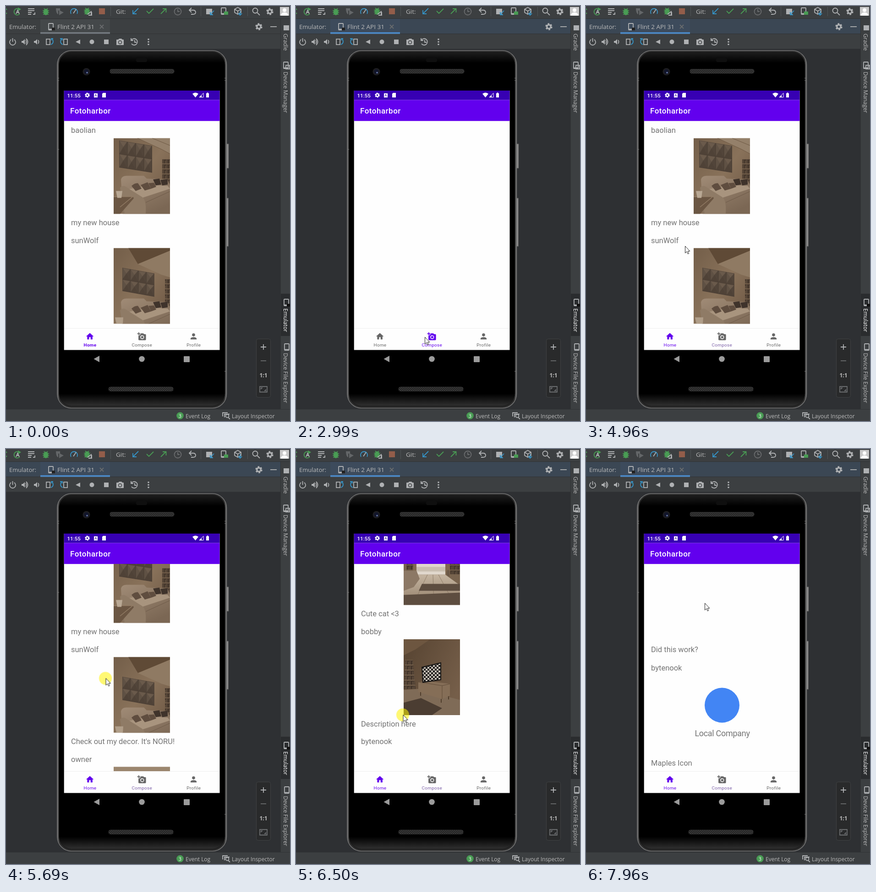
Animation of 620 by 903 pixels, one loop 8 s. Source, as an HTML page:

```html
<!DOCTYPE html>
<html lang="en">
<head>
<meta charset="utf-8">
<title>Emulator</title>
<style>
html, body { margin: 0; width: 100%; height: 100%; overflow: hidden; background: #3c3f41; }
svg { display: block; }
#stage { width: 620px; height: 903px; }
text { white-space: pre; }
.ide { font: 12px "Open Sans", "Noto Sans", sans-serif; fill: #bbb; }
.app { font-family: Roboto, sans-serif; }
.post { font-size: 16.5px; fill: #737373; }
.nav { font-size: 9.9px; letter-spacing: .33px; text-anchor: middle; }
.line { fill: none; stroke: #afb1b3; stroke-width: 1.8; }
.solid { fill: #afb1b3; }
.dim { stroke: #6a6c6e; }
.green { stroke: #499c54; }
.blue { stroke: #3592c4; }

#cursor, #feed, #dot, .focus, .page, .photos, .ripple, .home, .compose, .label {
  animation: 8s linear infinite;
}
#dot, .focus, .page, .photos, .home, .compose, .label { animation-timing-function: step-end; }
#cursor { animation-name: move; }
#feed { animation-name: scroll; }
#dot { animation-name: press; }
.focus { animation-name: focus; }
.page { animation-name: page; }
.photos { animation-name: photos; }
.home { animation-name: home; }
.compose { animation-name: compose; }
.label { animation-name: label; }
.ripple { transform-box: fill-box; transform-origin: center; }
#rippleA { animation-name: rippleA; }
#rippleB { animation-name: rippleB; }

@keyframes move {
  0%, 6.36% { transform: translate(574px, 925px); }
  6.37% { transform: translate(574px, 893px); }
  16.25% { transform: translate(400px, 782px); }
  17.1% { transform: translate(390px, 772px); }
  20.5%, 27.09% { transform: translate(279px, 720px); }
  27.1%, 41.25% { transform: translate(281px, 720px); }
  46.25%, 51.8% { transform: translate(217.5px, 723px); }
  61.1% { transform: translate(192px, 514px); }
  62%, 65.3% { transform: translate(216px, 522px); }
  68.3%, 68.8% { transform: translate(217px, 578px); }
  71.1% { transform: translate(217.5px, 501px); }
  73.8%, 76% { transform: translate(220px, 317px); }
  80.3%, 85.3% { transform: translate(233.5px, 578px); }
  90%, 100% { transform: translate(259px, 335px); }
}
@keyframes scroll {
  0%, 68.8% { transform: translateY(0); }
  71.1%, 71.15% { transform: translateY(-74px); }
  73.8% { transform: translateY(-252px); }
  75.37% { transform: translateY(-348px); }
  76.5% { transform: translateY(-438px); }
  77.8% { transform: translateY(-518px); }
  79.2% { transform: translateY(-569px); }
  80.7%, 85.5% { transform: translateY(-591px); }
  90% { transform: translateY(-825px); }
  91.5% { transform: translateY(-907px); }
  93.2% { transform: translateY(-962px); }
  95.4% { transform: translateY(-989px); }
  98%, 100% { transform: translateY(-992px); }
}
@keyframes press {
  0%, 32.6%, 49.6%, 73.9%, 90%, 100% { opacity: 0; }
  30.6%, 47.9%, 68.5%, 80.8% { opacity: 1; }
}
@keyframes focus { 0% { opacity: 0; } 30.7%, 100% { opacity: 1; } }
@keyframes page { 0%, 54%, 100% { opacity: 1; } 32.6% { opacity: 0; } }
@keyframes photos { 0%, 56%, 100% { opacity: 1; } 32.6% { opacity: 0; } }
@keyframes home {
  0% { fill: #6200ee; font-weight: 600; }
  32.6% { fill: #666; font-weight: 400; }
  49.6%, 100% { fill: #6200ee; font-weight: 400; }
}
@keyframes compose { 0%, 49.6%, 100% { fill: #666; } 32.6% { fill: #6200ee; } }
@keyframes label { 0%, 49.6% { fill: #666; } 32.6% { fill: #6200ee; } 54%, 100% { fill: #7c60a8; } }
@keyframes rippleA {
  0%, 30.6% { opacity: 0; transform: scale(.3); }
  32.6% { opacity: 1; transform: scale(1); }
  37%, 100% { opacity: 0; transform: scale(1.2); }
}
@keyframes rippleB {
  0%, 47.9% { opacity: 0; transform: scale(.3); }
  50.3%, 51.6% { opacity: 1; transform: scale(1); }
  56%, 100% { opacity: 0; transform: scale(1.2); }
}
</style>
</head>
<body>
<svg id="stage" viewBox="0 0 620 903">
<defs>
  <g id="gear" fill="none">
    <circle r="4.2" stroke-width="3.2"/>
    <circle r="6.4" stroke-width="2.6" stroke-dasharray="3.7 3"/>
  </g>
  <g id="bug">
    <path d="M-7-2H7M-7 2H7M-6 6H6M-4-7 4 6M4-7-4 6" stroke-width="1.6"/>
    <ellipse cy="1" rx="4.6" ry="6.5"/>
  </g>
  <g id="phone"><rect x="-5" y="-7" width="10" height="14" rx="1" class="line"/><path d="M-4 5.5H4" class="line"/></g>
  <g id="speaker"><path d="M-7-2h3l4-4V6l-4-4h-3z" class="solid"/></g>
  <pattern id="mesh" width="4" height="4" patternUnits="userSpaceOnUse">
    <rect width="4" height="4" fill="#101010"/><path d="M0 0 4 4M4 0 0 4" stroke="#5b5b5b" stroke-width=".8"/>
  </pattern>
  <pattern id="tiles" width="18" height="31" patternUnits="userSpaceOnUse">
    <rect width="18" height="31" fill="#463a30"/>
    <path d="M.5.500H17.500L9 14z" fill="#6a5a4b"/><path d="M17.500.500V30.500L9 14z" fill="#52453a"/>
    <path d="M.5.500V30.500L9 14z" fill="#5f5144"/><path d="M.5 30.500H17.500L9 14z" fill="#4f4237"/>
  </pattern>
  <pattern id="shelf" width="17" height="11" patternUnits="userSpaceOnUse">
    <rect width="17" height="11" fill="#45372c"/><path d="M0 1H17" stroke="#826b54" stroke-width="1.6"/>
    <path d="M3 4v7M6 3v8M11 5v6M14 3v8" stroke="#6b5846" stroke-width="1.3"/>
  </pattern>
  <pattern id="check" width="8" height="8" patternUnits="userSpaceOnUse">
    <rect width="8" height="8" fill="#1d1b1a"/><path d="M0 0h4v8h4V4H0z" fill="#c5beb5"/>
  </pattern>
  <linearGradient id="wall" x2="1" y2="1"><stop stop-color="#735e49"/><stop offset=".5" stop-color="#89725a"/><stop offset="1" stop-color="#6a5441"/></linearGradient>
  <linearGradient id="dusk" x2="1" y2=".6"><stop stop-color="#564331"/><stop offset="1" stop-color="#755e49"/></linearGradient>
  <linearGradient id="cloth" x2=".6" y2="1"><stop stop-color="#a08b76"/><stop offset="1" stop-color="#7b6754"/></linearGradient>
  <linearGradient id="floor" x2="0" y2="1"><stop stop-color="#c5b5a1"/><stop offset="1" stop-color="#917d68"/></linearGradient>
  <linearGradient id="body"><stop stop-color="#6f6f6f"/><stop offset=".014" stop-color="#2b2b2b"/><stop offset=".986" stop-color="#2b2b2b"/><stop offset="1" stop-color="#6f6f6f"/></linearGradient>
  <linearGradient id="glass" x2="0" y2="1"><stop stop-color="#1d1d1d"/><stop offset=".03" stop-color="#000"/><stop offset=".965" stop-color="#000"/><stop offset="1" stop-color="#303030"/></linearGradient>
  <radialGradient id="glow"><stop offset=".62" stop-color="#000" stop-opacity=".17"/><stop offset="1" stop-color="#000" stop-opacity="0"/></radialGradient>
  <filter id="soft" x="0" y="0" width="1" height="1"><feGaussianBlur stdDeviation=".6"/></filter>
  <clipPath id="list"><rect x="127" y="250" width="339" height="452"/></clipPath>
  <clipPath id="tabs"><rect x="127" y="702" width="339" height="46"/></clipPath>
  <clipPath id="frame"><rect width="123" height="165"/></clipPath>
  <g id="sofa">
    <path d="M16 90Q18 82 28 82H66L72 88 118 90 123 104V165H20z" fill="url(#cloth)"/>
    <path d="M26 112 84 102 118 104 123 110 62 130z" fill="#a8947e"/>
    <path d="M14 108Q20 100 30 108L62 128Q72 134 70 165H24z" fill="#8f7b66"/>
    <path d="M70 140 123 116" stroke="#6d5a48" fill="none"/>
    <path d="M39 104Q46 97 53 98L61 110 48 115zM59 102 74 96 82 110 68 114zM76 98 88 97 93 106 82 110z" fill="#5f4d3f"/>
    <path d="M86 90 100 88 104 101 92 103zM102 91 118 89V101L106 103z" fill="#3f332b"/>
  </g>
</defs>

<!-- IDE panels -->
<rect width="620" height="903" fill="#3c3f41"/>
<rect y="94" width="599" height="783" fill="#2e3033"/>
<path d="M0 27.5H620M0 60.5H599M0 93.5H599M599.5 28V877M0 877.5H620" stroke="#313335" fill="none"/>
<rect x="75" y="29" width="152" height="28" fill="#44484a"/>
<rect x="75" y="57" width="152" height="3.5" fill="#747a80"/>
<g class="focus">
  <rect y="28" width="599" height="32" fill="#3b4754"/>
  <rect x="75" y="28" width="152" height="29" fill="#3d4b5c"/>
  <rect x="75" y="57" width="152" height="3.5" fill="#4a88c7"/>
</g>
<rect x="600" y="626" width="20" height="92" fill="#2a2c2e"/>

<!-- main toolbar -->
<path d="M0 6 2 8M0 17 2 15" class="line green"/>
<g transform="translate(24 12)"><path d="M3-6A7 7 0 1 0 6 5" class="line green"/><path d="M2-9 9-5 3-1z" fill="#499c54"/><path d="M-2 5 1.5-3 5 5M0 2H4" class="line" stroke-width="1.4"/></g>
<path d="M48 6H62M48 10H62M48 14H56M48 18H55M63 14V18H59" class="line"/>
<use href="#bug" x="87" y="12" stroke="#499c54" fill="#499c54"/>
<path d="M109 5H118V10H114V18Q109 17 109 5zM116 9 126 14 116 20z" fill="#636668"/>
<path d="M142 17A7.5 7.5 0 1 1 155 17" class="line blue" stroke-width="2.5"/><path d="M147 16 153 7" class="line"/>
<use href="#bug" x="177" y="11" stroke="#499c54" fill="#499c54"/><path d="M178 18 186 12V19M180 20H187V13" class="line"/>
<rect x="203" y="5" width="13" height="13" fill="#935d4a"/>
<path d="M228.5 2V22M425.5 2V22M527.5 2V22" stroke="#515557"/>
<text x="240" y="17" class="ide" style="font-size:13.5px">Git:</text>
<path d="M289 5 278 16M277 9V17H285" class="line blue" stroke-width="2.4"/>
<path d="M307 11 312 16 322 6" class="line green" stroke-width="2.8"/>
<path d="M338 17 349 6M342 6H349.5V14" class="line green" stroke-width="2.4"/>
<circle cx="375" cy="12" r="7.5" class="line dim"/><path d="M375 7V12H379" class="line dim"/>
<path d="M405 4 400 9 405 14M400 9H408Q414 9 414 14 414 18 408 18H404" class="line"/>
<rect x="437" y="6" width="13" height="12" class="solid"/><path d="M454 10 446 19M446 13V19H452" class="line blue"/>
<use href="#phone" x="475" y="11"/><rect x="476" y="12" width="9" height="7" fill="#499c54"/>
<path d="M499 7 506 3 513 7V14L506 18 499 14zM499 7 506 11 513 7M506 11V18" class="line"/><path d="M511 11V20M507 16 511 20 515 16" class="line blue"/>
<circle cx="544" cy="10" r="5.5" class="line" stroke-width="2.2"/><path d="M548 14 554 20" class="line" stroke-width="2.5"/>
<use href="#gear" x="576" y="12" stroke="#afb1b3"/>
<rect x="598" y="2" width="20" height="19" fill="#c9c9c9"/><circle cx="608" cy="9" r="4" fill="#fff"/><path d="M600 21Q600 14 608 14T616 21z" fill="#fff"/>

<!-- tool window header -->
<text x="7" y="50" class="ide" style="font-size:13px">Emulator:</text>
<use href="#phone" x="98" y="45"/><rect x="100" y="47" width="7" height="6" fill="#222"/>
<text x="112" y="50" class="ide" style="font-size:13.5px">Flint 2 API 31</text>
<path d="M205 41 213 49M213 41 205 49" class="line dim" stroke-width="1.3"/>
<use href="#gear" x="552" y="45" stroke="#afb1b3"/><path d="M577 45H591" class="line"/>

<!-- device controls -->
<path d="M11 73A6.5 6.5 0 1 0 18 73M14.5 70V78" class="line"/>
<use href="#speaker" x="41" y="78"/><path d="M43 74Q46 78 43 82M44 71Q51 78 44 85" class="line" stroke-width="1.5"/>
<use href="#speaker" x="68" y="78"/><path d="M70 74Q73 78 70 82" class="line" stroke-width="1.5"/>
<rect x="88" y="72" width="8" height="12" class="line"/><path d="M98 84Q106 80 101 72M99 75V71H103" class="line blue"/>
<rect x="126" y="72" width="8" height="12" class="line"/><path d="M124 84Q116 80 121 72M123 75V71H118" class="line blue"/>
<path d="M152 78 162 73V83z" class="solid"/><circle cx="187.5" cy="78" r="5" class="solid"/><rect x="214" y="73" width="10" height="10" class="solid"/>
<rect x="241" y="73" width="16" height="12" rx="1" class="solid"/><path d="M245 73 247 71H252L254 73z" class="solid"/><circle cx="249" cy="79" r="3.5" fill="none" stroke="#3c3f41" stroke-width="1.5"/>
<path d="M274 74A7 7 0 1 1 274 82M273 70V75H278M281 74V79H285" class="line"/>
<g class="solid"><circle cx="311" cy="72.5" r="1.8"/><circle cx="311" cy="78" r="1.8"/><circle cx="311" cy="83.5" r="1.8"/></g>

<!-- right rail -->
<rect x="606" y="42" width="12" height="11" class="solid"/>
<use href="#phone" x="611" y="129"/><rect x="611" y="129" width="8" height="8" class="line" fill="#3c3f41"/>
<use href="#phone" x="612" y="645"/><rect x="613" y="648" width="7" height="6" fill="#111"/>
<use href="#phone" x="613" y="742"/>
<g class="ide">
  <text transform="translate(605.5 60) rotate(90)">Gradle</text>
  <text transform="translate(605.5 143) rotate(90)">Device Manager</text>
  <text transform="translate(605.5 658) rotate(90)" fill="#fff">Emulator</text>
  <text transform="translate(605.5 755) rotate(90)">Device File Explorer</text>
</g>

<!-- zoom panel and status bar -->
<rect x="546.5" y="724.5" width="31" height="127" rx="4" fill="#292a2b" stroke="#404244"/>
<path d="M556 742H568M562 736V748" class="line"/><path d="M556 772H568" class="line dim"/>
<text x="562" y="808" class="ide" text-anchor="middle" style="font-weight:700">1:1</text>
<path d="M554 828H570V840H554zM557 834V831H560M567 834V837H564" class="line dim" stroke-width="1.4"/>
<circle cx="380" cy="891.5" r="7.8" fill="#499c54"/>
<text x="380" y="896" text-anchor="middle" class="ide" style="font-size:11px;fill:#fff">3</text>
<text x="392" y="897" class="ide">Event Log</text>
<path d="M473 893V885H484M477 895V888H488" class="line" stroke-width="1.4"/><circle cx="483" cy="892" r="3.5" class="line" stroke-width="1.5"/><path d="M485 895 489 899" class="line"/>
<text x="493" y="897" class="ide">Layout Inspector</text>

<!-- phone body -->
<path d="M481 300H486V353H481zM481 418H485.5V523H481z" fill="#8b8b8b" stroke="#555"/>
<rect x="112" y="97" width="369.5" height="778" rx="31" fill="url(#body)" stroke="#737373" stroke-width="1.6"/>
<rect x="115.500" y="100.500" width="362.500" height="770" rx="28" fill="url(#glass)" stroke="#161616"/>
<path d="M112 157H116M112 162H116M112 312H116M477 157H481M477 162H481M477 795H481" stroke="#777"/>
<rect x="284" y="113" width="24" height="9" rx="4" fill="#0f0f0f"/>
<circle cx="175.5" cy="143" r="8" fill="#1d1d20"/><circle cx="175.5" cy="143" r="5" fill="#11152b"/><circle cx="177" cy="145" r="1.8" fill="#6b7dab"/>
<rect x="227" y="137.5" width="140" height="9" rx="4" fill="url(#mesh)" stroke="#333"/>
<rect x="224" y="829" width="141" height="9" rx="4" fill="url(#mesh)" stroke="#333"/>
<path d="M191.5 768 204 761V775z" fill="#9b9b9b"/><circle cx="296.5" cy="768" r="6.3" fill="#9b9b9b"/><rect x="388" y="762" width="13" height="13" rx="1" fill="#9b9b9b"/>

<!-- app -->
<rect x="126.7" y="184" width="339.8" height="564.5" fill="#fefefe"/>
<rect x="126.7" y="184" width="339.8" height="20.5" fill="#3700b3"/>
<rect x="126.7" y="204.5" width="339.8" height="45.7" fill="#6200ee"/>
<g class="app" fill="#fff">
  <text x="133.5" y="198.5" font-size="11.6" font-weight="500">11:55</text>
  <text x="140" y="234" font-size="17" font-weight="500" letter-spacing=".5">Fotoharbor</text>
  <g stroke="#fff" transform="translate(177.5 194) scale(.7)"><use href="#gear"/></g>
  <rect x="192" y="190" width="8" height="9"/><path d="M194 197 196 192 198 197" fill="none" stroke="#3700b3"/>
  <path d="M212 189H218V199H210V191z"/>
  <path d="M407 191Q413.5 186 420 191L413.5 199z"/>
  <path d="M422 198.5H431V189.5z" fill="none" stroke="#fff"/><path d="M422 198.5H427V194z"/>
  <path d="M437 190H438.5V188.5H441.5V190H443V199H437z"/>
</g>
<g clip-path="url(#list)"><g id="feed">
  <g class="app post page">
    <text x="142" y="276">baolian</text><text x="142" y="477">my new house</text>
    <text x="142" y="515.5">sunWolf</text><text x="142" y="716">Check out my decor. It's NORU!</text>
    <text x="142" y="755">owner</text><text x="142" y="955">Cute cat &lt;3</text>
    <text x="142" y="994">bobby</text><text x="142" y="1195">Description here</text>
    <text x="142" y="1233">bytenook</text><text x="142" y="1434">Did this work?</text>
    <text x="142" y="1473.5">bytenook</text><text x="142" y="1681">Maples Icon</text>
  </g>
  <g class="photos">
    <g transform="translate(235 287.5)" clip-path="url(#frame)">
      <rect width="123" height="165" fill="url(#wall)"/>
      <g filter="url(#soft)">
        <path d="M52 0H123V34L104 24z" fill="#94806a"/><path d="M52 0 104 24 123 34M84 0 123 16" fill="none" stroke="#6d5843"/>
        <path d="M106 46H123V100H106z" fill="url(#shelf)"/>
        <rect transform="translate(12 5) skewY(9) scale(1 .95)" width="72" height="62" fill="url(#tiles)"/>
        <use href="#sofa"/>
        <path d="M0 128 42 127 44 131 14 165H0z" fill="#6b5643"/><path d="M0 127.500 42 127 14 150" fill="none" stroke="#937d66" stroke-width="1.5"/>
        <path d="M5 115H19L17 130H8z" fill="#b9a894"/>
      </g>
    </g>
    <g transform="translate(235 526.5)" clip-path="url(#frame)">
      <rect width="123" height="165" fill="url(#wall)"/>
      <g filter="url(#soft)">
        <path d="M32 0H123V6L53 35z" fill="#5f4a36"/><path d="M53 35 123 6V64L104 58z" fill="#8f7a63"/>
        <path d="M112 68H123V125H112z" fill="url(#shelf)"/>
        <rect transform="translate(19 43) skewY(10) scale(.97 .82)" width="72" height="62" fill="url(#tiles)"/>
        <use href="#sofa" y="28"/>
        <path d="M3 151H21L20 165H6z" fill="#b09e89"/>
      </g>
    </g>
    <g transform="translate(235 765.5)" clip-path="url(#frame)">
      <rect width="123" height="165" fill="#78634e"/>
      <g filter="url(#soft)">
        <path d="M0 0H123V22L92 38H29L0 24z" fill="#9b866e"/>
        <path d="M6 35H24V92H6zM98 32H123V98H98z" fill="url(#shelf)"/>
        <path d="M22 38H30V98H20zM91 38H99L102 102H91z" fill="#806850"/>
        <rect x="28" y="38" width="63" height="61" fill="#e0d7cc"/><path d="M28 82H91V92H28z" fill="#c9beb0"/>
        <path d="M28 99H91L123 122V165H0V128z" fill="url(#floor)"/>
        <path d="M52 99 20 165M64 99 66 165M76 99 112 165" stroke="#85715d" stroke-width=".8"/>
        <path d="M40 119H123V134H33zM0 143 123 138V165H0z" fill="#5d4d40"/>
        <path d="M0 90 28 90 35 108 22 126 0 134z" fill="#8c7865"/>
        <path d="M94 100Q93 90 97 88 102 91 100 103z" fill="#6c5947"/>
      </g>
    </g>
    <g transform="translate(235 1005)" clip-path="url(#frame)">
      <rect width="123" height="165" fill="url(#dusk)"/>
      <g filter="url(#soft)">
        <path d="M0 0H58L26 22 0 35z" fill="#6d5640"/>
        <path d="M3 45H20L26 108H0z" fill="url(#shelf)"/>
        <path d="M0 110 32 108 123 132V165H0z" fill="#7f6b57"/>
        <path d="M0 138 38 128 84 150 62 165H0z" fill="#4b3d32"/>
        <path d="M32 93 54 91 101 97V123L84 130 32 115z" fill="#856e57"/><path d="M32 93 84 101 101 97M84 101V130" fill="none" stroke="#604c39"/>
        <path d="M39 60 82 50V89L41 95z" fill="#191716"/><path d="M41 62 80 53V87L43 92z" fill="url(#check)"/>
        <path d="M37 115V123M82 130V138M98 124V131" stroke="#4f3d2b" stroke-width="2"/>
      </g>
    </g>
    <circle cx="297" cy="1549.5" r="38" fill="#4285f4"/>
    <text x="297.5" y="1617" class="app" text-anchor="middle" font-size="18" letter-spacing="-.3" fill="#757575">Local Company</text>
  </g>
</g></g>

<!-- bottom navigation -->
<path d="M127 701.5H466" stroke="#efefef"/>
<g clip-path="url(#tabs)">
  <circle id="rippleA" class="ripple" cx="294" cy="725" r="48" fill="url(#glow)"/>
  <circle id="rippleB" class="ripple" cx="198" cy="725" r="48" fill="url(#glow)"/>
</g>
<g class="app nav" fill="#666">
  <path class="home" transform="translate(173.2 709) scale(.825)" d="M10 20v-6h4v6h5v-8h3L12 3 2 12h3v8z"/>
  <path class="compose" transform="translate(286.6 709) scale(.825)" fill-rule="evenodd" d="M3 4V1h2v3h3v2H5v3H3V6H0V4zM6 10V7h3V4h7l1.8 2H21q2 0 2 2v12q0 2-2 2H5q-2 0-2-2V10zM13 19a5 5 0 1 0 0-10 5 5 0 0 0 0 10zM13 17.2a3.2 3.2 0 1 0 0-6.4 3.2 3.2 0 0 0 0 6.4z"/>
  <path transform="translate(399.6 709) scale(.825)" d="M12 12a4 4 0 1 0 0-8 4 4 0 0 0 0 8zM12 14c-2.67 0-8 1.34-8 4v2h16v-2c0-2.66-5.33-4-8-4z"/>
  <text class="home" x="183.5" y="740.5">Home</text>
  <text class="label" x="296.7" y="740.5">Compose</text>
  <text x="409.8" y="740.5">Profile</text>
</g>

<g id="cursor">
  <circle id="dot" cx="-.5" cy=".5" r="14" fill="#fff200" fill-opacity=".55"/>
  <path d="M.5.5V15.5L4 12.3 6.3 17.5 8.6 16.5 6.4 11.4H10.8z" fill="#fff" stroke="#222"/>
</g>
</svg>
</body>
</html>
```
